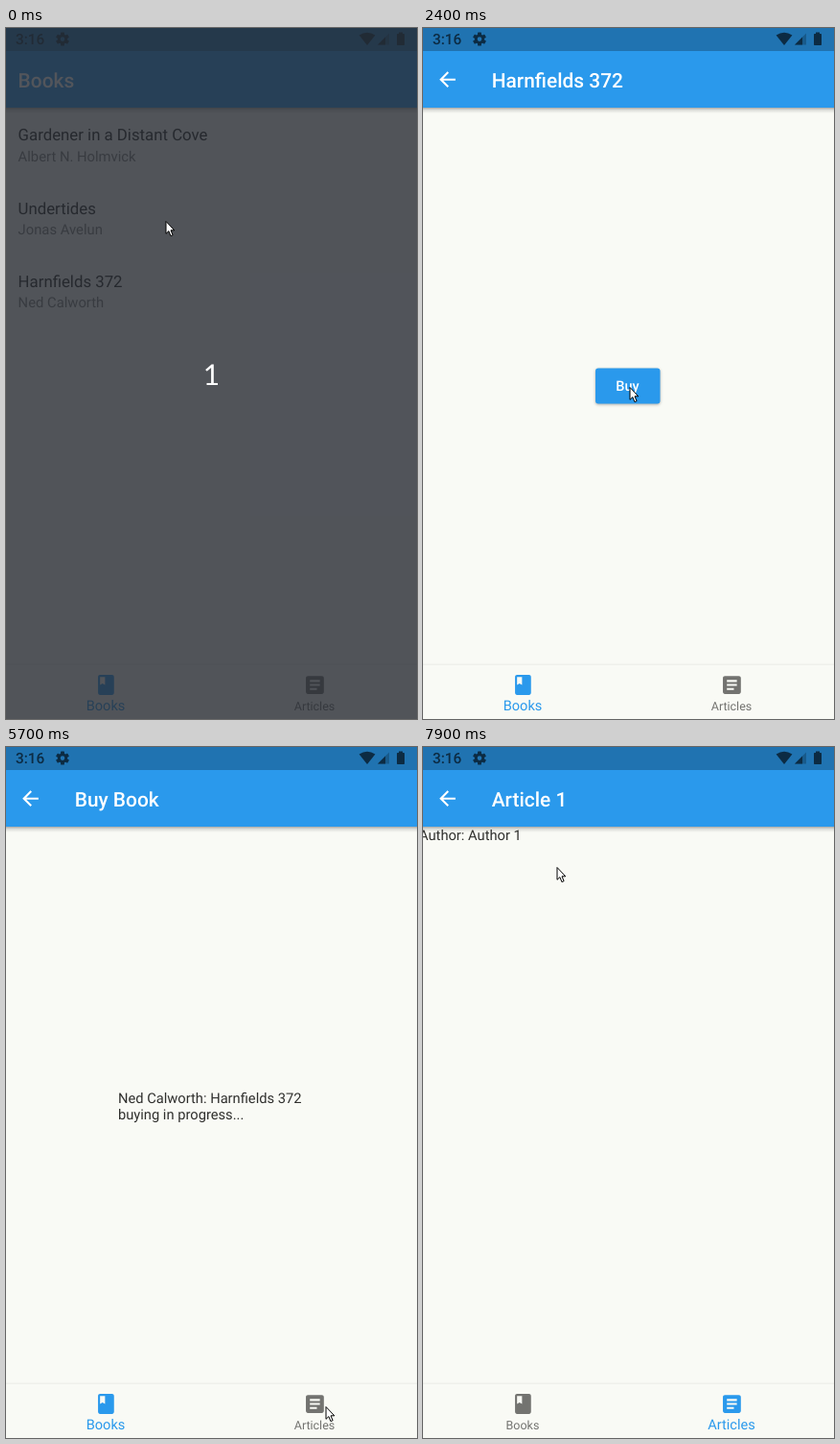
An HTML page for the animation above (8 s loop, 429 px wide and 720 px high).

```html
<!DOCTYPE html>
<html lang="en">
<head>
<meta charset="utf-8">
<title>Books</title>
<style>
  html, body { margin: 0; width: 100%; height: 100%; overflow: hidden; background: #f9faf5; }
  svg { display: block; width: 100%; height: 100%; }
  text { font-family: Roboto, Arial, sans-serif; text-rendering: geometricPrecision; white-space: pre; }
  .bar { font-size: 20.9px; font-weight: 500; fill: #fff; }
  .name { font-size: 16.8px; fill: #21211f; }
  .by { font-size: 14.8px; fill: #7d7d7a; }
  .body { font-size: 14.7px; fill: #2f2f2d; }
  .buy { font-size: 14.6px; font-weight: 500; fill: #fff; }
  .clock { font-size: 15.4px; font-weight: 500; }
  .count { font-family: Lato, sans-serif; font-size: 30px; fill: #fff; }
  .raised { filter: drop-shadow(0 1.5px 1.5px rgba(0, 0, 0, .3)); }
</style>
</head>
<body>
<svg id="stage" viewBox="0 0 429 720"></svg>
<script>
const LOOP = 8000, STEP = 100;
const BLUE = '#2a99ec', PAPER = '#f9faf5';
const SLIDE = 164; // a quarter of the page height

const books = [
  ['Gardener in a Distant Cove', 'Albert N. Holmvick'],
  ['Undertides', 'Jonas Avelun'],
  ['Harnfields 372', 'Ned Calworth'],
];
const articles = [['Article 1', 'Author 1'], ['Article 2', 'Author 2']];

const icons = {
  back: 'M20 11H7.83l5.59-5.59L12 4l-8 8 8 8 1.41-1.41L7.83 13H20v-2z',
  book: 'M18 2H6c-1.1 0-2 .9-2 2v16c0 1.1.9 2 2 2h12c1.1 0 2-.9 2-2V4c0-1.1-.9-2-2-2zM6 4h5v8l-2.5-1.5L6 12V4z',
  article: 'M19 3H5c-1.1 0-2 .9-2 2v14c0 1.1.9 2 2 2h14c1.1 0 2-.9 2-2V5c0-1.1-.9-2-2-2zm-5 14H7v-2h7v2zm3-4H7v-2h10v2zm0-4H7V7h10v2z',
};

const text = (cls, x, y, s, extra = '') => `<text class="${cls}" x="${x}" y="${y}" ${extra}>${s}</text>`;
const icon = (name, cx, cy, extra = '') =>
  `<path d="${icons[name]}" transform="translate(${cx - 12.5} ${cy - 12.5}) scale(1.043)" ${extra}/>`;

const rows = list => list.map(([name, by], i) =>
  text('name', 12.6, 117.3 + i * 76.3, name) + text('by', 12.6, 138.6 + i * 76.3, by)).join('');

const page = (id, title, body, nested) => `<g id="${id}">
  <rect width="429" height="664" fill="${PAPER}"/>
  <rect y="83" width="429" height="6" fill="url(#shade)"/>
  <rect width="429" height="83" fill="${BLUE}"/>
  ${nested ? icon('back', 25.5, 53.7, 'fill="#fff"') : ''}
  ${text('bar', nested ? 71.7 : 12.6, 62, title)}
  ${body}</g>`;

function gear(cx, cy) {
  let teeth = '';
  for (let i = 0; i < 6; i++)
    teeth += `<rect x="-1.9" y="-7" width="3.8" height="4" rx=".6" transform="rotate(${i * 60})"/>`;
  return `<g transform="translate(${cx} ${cy})">${teeth}
    <circle r="3.7" fill="none" stroke="#0c2b43" stroke-width="2.8"/></g>`;
}

const [title, author] = books[2];
document.getElementById('stage').innerHTML = `
  <defs>
    <linearGradient id="shade" x2="0" y2="1">
      <stop stop-opacity=".32"/><stop offset=".4" stop-opacity=".12"/><stop offset="1" stop-opacity="0"/>
    </linearGradient>
    <clipPath id="view"><rect width="429" height="663"/></clipPath>
    <clipPath id="row"><rect y="236" width="429" height="75"/></clipPath>
  </defs>
  <g clip-path="url(#view)">
    ${page('list', 'Books', `<g clip-path="url(#row)"><circle id="ripple" cx="110" cy="277" r="179" fill-opacity=".025"/></g>` + rows(books))}
    ${page('detail', title, `<rect class="raised" x="180" y="354.5" width="67.5" height="37" rx="3" fill="${BLUE}"/>` +
      text('buy', 213.4, 378.4, 'Buy', 'text-anchor="middle"'), true)}
    ${page('order', 'Buy Book', text('body', 117, 370.6, `${author}: ${title}`) +
      text('body', 117, 387.6, 'buying in progress...'), true)}
    ${page('articles', 'Articles', rows(articles))}
    ${page('article', 'Article 1', text('body', -4, 97, 'Author: Author 1'), true)}
  </g>
  <rect width="429" height="24" fill-opacity=".25"/>
  <g fill="#0c2b43">
    ${text('clock', 10, 17.2, '3:16')}
    ${gear(59, 11.6)}
    <path d="M377 18L368.6 7.6Q377 1.8 385.4 7.6Z"/>
    <path d="M400 5.5V17.5H388Z" fill-opacity=".35"/>
    <path d="M396 9.5V17.5H388Z"/>
    <path d="M410 4.5h4v1.5h1.2q.8 0 .8.8v10.4q0 .8-.8.8h-6.4q-.8 0-.8-.8V6.8q0-.8.8-.8h1.2z"/>
  </g>
  <rect y="663" width="429" height="57" fill="${PAPER}"/>
  <rect y="662.5" width="429" height="1.5" fill-opacity=".04"/>
  <g id="tabBooks">${icon('book', 104.4, 684.5)}${text('', 104, 711, 'Books', 'text-anchor="middle"')}</g>
  <g id="tabArticles">${icon('article', 322.4, 684.5)}${text('', 322, 711.2, 'Articles', 'text-anchor="middle"')}</g>
  <g id="countdown"><rect width="429" height="720" fill="#272b33" fill-opacity=".8"/>
    ${text('count', 214.4, 371.5, '1', 'text-anchor="middle"')}</g>
  <path id="cursor" d="M.5 .5V13.3L3.4 10.6L5.4 15.6L7.6 14.7L5.5 9.8H9.3Z" fill="#fff" stroke="#000" stroke-width="1"/>`;

const $ = id => document.getElementById(id);
const show = (el, on) => { el.style.display = on ? '' : 'none'; };

// Each page: start time, then its progress at every step
const entries = {
  detail: [1500, .57, .87],
  order: [3300, .57, .83],
  articles: [6000, .25, .56, .87],
  article: [7600, .25, .56, .87],
};
const tabSwitch = [6000, .15, .6, .95];

// Pointer stops: time, x, y
const stops = [
  [0, 166.5, 201], [200, 166.5, 201], [600, 110, 277], [2000, 110, 277], [2400, 215.5, 374],
  [3800, 215.5, 374], [3900, 206, 377], [4300, 206, 377], [4500, 203, 393], [4600, 203, 393],
  [5500, 354, 678], [5700, 333.5, 687], [6500, 333.5, 687], [6800, 176.5, 199], [7200, 139.5, 125],
  [LOOP, 139.5, 125],
];

function bezier(x1, y1, x2, y2) {
  const at = (a, b, u) => 3 * a * u * (1 - u) ** 2 + 3 * b * u * u * (1 - u) + u ** 3;
  return x => {
    let lo = 0, hi = 1;
    for (let i = 0; i < 24; i++) {
      const mid = (lo + hi) / 2;
      if (at(x1, x2, mid) < x) lo = mid; else hi = mid;
    }
    return at(y1, y2, lo);
  };
}
const slideEase = bezier(.4, 0, .2, 1);
const fadeEase = bezier(.42, 0, 1, 1);
const lerp = (a, b, k) => a + (b - a) * k;

const progress = ([start, ...values], t) =>
  t < start ? 0 : values[Math.floor((t - start) / STEP)] ?? 1;

function pointer(t) {
  const i = stops.findIndex(s => s[0] > t);
  const [t0, x0, y0] = stops[i - 1], [t1, x1, y1] = stops[i];
  const k = (t - t0) / (t1 - t0), e = k * k * (3 - 2 * k);
  return [lerp(x0, x1, e), lerp(y0, y1, e)];
}

function paintTab(el, k) {
  const mix = [[115, 42], [115, 153], [112, 236]].map(([a, b]) => Math.round(lerp(a, b, k)));
  el.setAttribute('fill', `rgb(${mix})`);
  el.querySelector('text').style.fontSize = lerp(12.5, 14.6, k) + 'px';
}

function draw(time) {
  const t = Math.floor(time % LOOP / STEP) * STEP;
  for (const id in entries) {
    const p = progress(entries[id], t), el = $(id);
    show(el, p > 0);
    el.setAttribute('opacity', p < 1 ? fadeEase(p) : 1);
    el.setAttribute('transform', `translate(0 ${p < 1 ? SLIDE * (1 - slideEase(p)) : 0})`);
  }
  show($('ripple'), t >= 1500 && t < 1700);
  show($('countdown'), t < STEP);
  const k = progress(tabSwitch, t);
  paintTab($('tabBooks'), 1 - k);
  paintTab($('tabArticles'), k);
  $('cursor').setAttribute('transform', `translate(${pointer(t)})`);
}

const began = performance.now();
function tick() {
  draw(performance.now() - began);
  requestAnimationFrame(tick);
}
tick();
</script>
</body>
</html>
```
